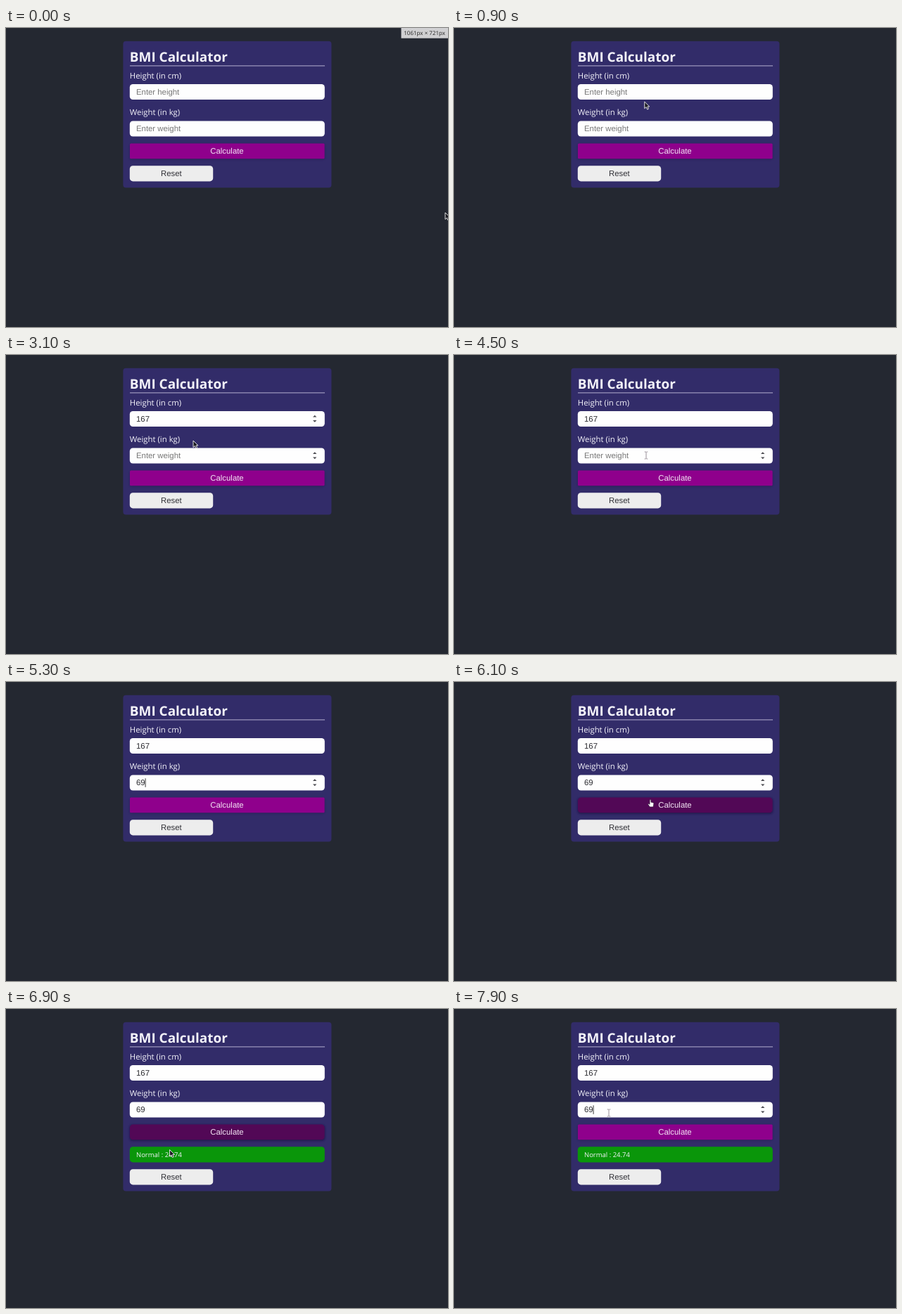
These frames come from a looping animation (628 px wide and 426 px high, 8 s). An HTML page:

```html
<!DOCTYPE html>
<html lang="en">
<head>
<meta charset="utf-8">
<title>BMI Calculator</title>
<style>
  html, body { margin: 0; width: 100%; height: 100%; overflow: hidden; background: #242831; }
  svg { display: block; width: 100vw; height: 100vh; }
  text { text-rendering: geometricPrecision; white-space: pre; }
  .open { font-family: "Open Sans", "Noto Sans", sans-serif; fill: #f4f3fa; }
  .ui { font-family: "Liberation Sans", Arial, sans-serif; font-size: 11.37px; }
  .label { font-size: 11.37px; }
  .tip { font-family: "Noto Sans", "Open Sans", sans-serif; font-size: 8px; fill: #303030; }
</style>
</head>
<body>
<svg viewBox="0 0 628 426" preserveAspectRatio="none">
  <defs>
    <filter id="soft" x="-10%" y="-60%" width="120%" height="220%">
      <feGaussianBlur stdDeviation="1.8"/>
    </filter>
    <path id="spin" d="M-2.7 -2.4 L0 -5.2 L2.7 -2.4Z M-2.7 2 L0 4.8 L2.7 2Z" fill="#4a4a50"/>
  </defs>
  <rect width="628" height="426" fill="#242831"/>
  <rect id="panel" x="166.4" y="18.7" width="296" rx="4" fill="#322c69"/>

  <text class="open" x="175.8" y="48.3" font-size="18.95" font-weight="700">BMI Calculator</text>
  <rect x="176" y="53.4" width="277" height="1" fill="#b4b0cf"/>

  <text class="open label" x="175.8" y="71.7">Height (in cm)</text>
  <rect x="175.8" y="79.9" width="277" height="22.2" rx="4.5" fill="#fefefe"/>
  <text id="height" class="ui" x="185" y="94.8"></text>
  <use id="heightSpin" href="#spin" x="438.7" y="91"/>

  <text class="open label" x="175.8" y="124.1">Weight (in kg)</text>
  <rect x="175.8" y="132.4" width="277" height="22.2" rx="4.5" fill="#fefefe"/>
  <text id="weight" class="ui" x="185" y="147.3"></text>
  <use id="weightSpin" href="#spin" x="438.7" y="143.5"/>
  <rect id="caret" width="0.9" height="12.5" fill="#222"/>

  <rect id="glow" x="175.8" y="165.5" width="277" height="22" rx="4" fill="#1d103f" filter="url(#soft)"/>
  <rect id="button" x="176" y="164.6" width="276.6" height="21.6"/>
  <text class="ui" x="314" y="179.2" text-anchor="middle" fill="#f3e6f4">Calculate</text>

  <g id="result">
    <rect x="175.8" y="196.2" width="277" height="22.2" rx="4.5" fill="#0a960a"/>
    <text class="open" x="185" y="210.8" font-size="9.47">Normal : 24.74</text>
  </g>
  <g id="reset">
    <rect x="175.8" y="196.2" width="118.4" height="22.2" rx="4.5" fill="#ededed"/>
    <text class="ui" x="234.8" y="211.2" text-anchor="middle" fill="#303036">Reset</text>
  </g>

  <g id="tip">
    <rect x="561.5" y="0" width="67" height="14.6" fill="#d0d0d2"/>
    <text class="tip" x="565.3" y="10.3">1061px × 721px</text>
  </g>

  <g id="pointer">
    <path id="arrow" d="M0 0 V9.6 L2.3 7.5 L4 11 L5.7 10.2 L4.1 6.9 H7Z" fill="#1c1c22" stroke="#f2f2f2" stroke-width="0.9"/>
    <path id="beam" d="M-2.3 -5 H-0.6 L0 -4.4 L0.6 -5 H2.3 M0 -4.4 V4.4 M-2.3 5 H-0.6 L0 4.4 L0.6 5 H2.3" fill="none" stroke="#8f858f" stroke-width="0.9"/>
    <path id="hand" d="M-0.9 0.6 Q0 -0.6 0.9 0.6 V3.7 L4 4.4 Q5 4.8 4.8 6 L4 10.4 H-0.8 L-3.3 6.7 Q-3.2 5.5 -2 6 L-0.9 7Z" fill="#fff" stroke="#2a1230" stroke-width="0.6"/>
  </g>
</svg>
<script>
const LOOP = 8000, STEP = 100, DIGIT = 6.32, KEY_GAP = 200;
const CLICK = { height: 1100, weight: 3900, calculate: 6400, again: 7500 };
const FIRST_KEY = { height: 1900, weight: 5100 };
const MOUSE_BACK = 5900;

const ui = {};
document.querySelectorAll("[id]").forEach(el => ui[el.id] = el);

// pointer glides from one resting place to the next
const home = { x: 624, y: 263 };
const moves = [
  { from: 0, to: CLICK.height, x: 237, y: 90 },
  { from: 2300, to: 3100, x: 266, y: 122 },
  { from: 3500, to: 3700, x: 273, y: 143 },
  { from: MOUSE_BACK - STEP, to: 6100, x: 279, y: 167.5 },
  { from: CLICK.calculate, to: 6900, x: 232.5, y: 200.5 },
  { from: 6900, to: 7300, x: 230, y: 147 },
  { from: 7800, to: 7900, x: 220, y: 148 }
];

const between = (v, a, b) => v >= a && v < b;
const ramp = (t, a, b) => Math.min(1, Math.max(0, (t - a) / (b - a)));
const ease = k => k * k * (3 - 2 * k);
const lerp = (a, b, k) => a + (b - a) * k;
const mix = (a, b, k) => `rgb(${a.map((v, i) => Math.round(lerp(v, b[i], k)))})`;
const show = (el, on) => el.setAttribute("visibility", on ? "visible" : "hidden");
const set = (el, attrs) => Object.entries(attrs).forEach(([k, v]) => el.setAttribute(k, v));

function pointerAt(t) {
  return moves.reduce((p, m) => {
    const k = ease(ramp(t, m.from, m.to));
    return { x: lerp(p.x, m.x, k), y: lerp(p.y, m.y, k) };
  }, home);
}

function typeInto(name, t, value, hint) {
  const count = Math.max(0, Math.floor((t - FIRST_KEY[name]) / KEY_GAP) + 1);
  const typed = value.slice(0, count);
  ui[name].textContent = typed || hint;
  ui[name].setAttribute("fill", typed ? "#2b2b30" : "#777");
  return typed.length;
}

// the blink restarts with each click and each run of keys
function drawCaret(t, heightLen, weightLen) {
  const onWeight = t >= CLICK.weight;
  const starts = [CLICK.height, FIRST_KEY.height + KEY_GAP * 2, CLICK.weight,
                  FIRST_KEY.weight + KEY_GAP, CLICK.again + KEY_GAP];
  const since = t - Math.max(...starts.filter(s => s <= t));
  const typing = Object.values(FIRST_KEY).some(k => between(t, k, k + KEY_GAP * 2));
  const blurred = between(t, CLICK.calculate, CLICK.again);
  set(ui.caret, {
    x: 185 + (onWeight ? weightLen : heightLen) * DIGIT,
    y: onWeight ? 137.3 : 84.8
  });
  show(ui.caret, t >= CLICK.height && !blurred && (typing || since % 1100 < 600));
}

function drawButton(t) {
  const dark = ramp(t, MOUSE_BACK, 6100) - ramp(t, CLICK.again - STEP, CLICK.again + STEP);
  set(ui.button, { fill: mix([143, 0, 140], [82, 8, 86], dark), rx: 1.5 + 3 * dark });
  ui.glow.setAttribute("opacity", 0.35 + 0.45 * dark);
}

function drawPointer(t) {
  const { x, y } = pointerAt(t);
  const inside = between(x, 176, 453);
  const beam = inside && (between(y, 80, 102) || between(y, 132.5, 154.7));
  const hand = inside && between(y, 164.8, 186.2);
  const on = !between(t, FIRST_KEY.weight, MOUSE_BACK);
  ui.pointer.setAttribute("transform", `translate(${x} ${y})`);
  show(ui.beam, on && beam);
  show(ui.hand, on && hand);
  show(ui.arrow, on && !beam && !hand);
}

function draw(time) {
  const t = Math.floor(time / STEP) * STEP;
  const done = t >= CLICK.calculate;
  const heightLen = typeInto("height", t, "167", "Enter height");
  const weightLen = typeInto("weight", t, "69", "Enter weight");
  drawCaret(t, heightLen, weightLen);
  show(ui.heightSpin, between(t, CLICK.height - STEP, CLICK.weight));
  show(ui.weightSpin, between(t, 2700, CLICK.calculate) || t >= 7300);
  drawButton(t);
  show(ui.result, done);
  ui.reset.setAttribute("transform", `translate(0 ${done ? 32 : 0})`);
  ui.panel.setAttribute("height", done ? 240.8 : 208.8);
  show(ui.tip, t < 600);
  drawPointer(t);
}

const start = performance.now();
function tick() {
  draw((performance.now() - start) % LOOP);
  requestAnimationFrame(tick);
}
tick();
</script>
</body>
</html>
```
